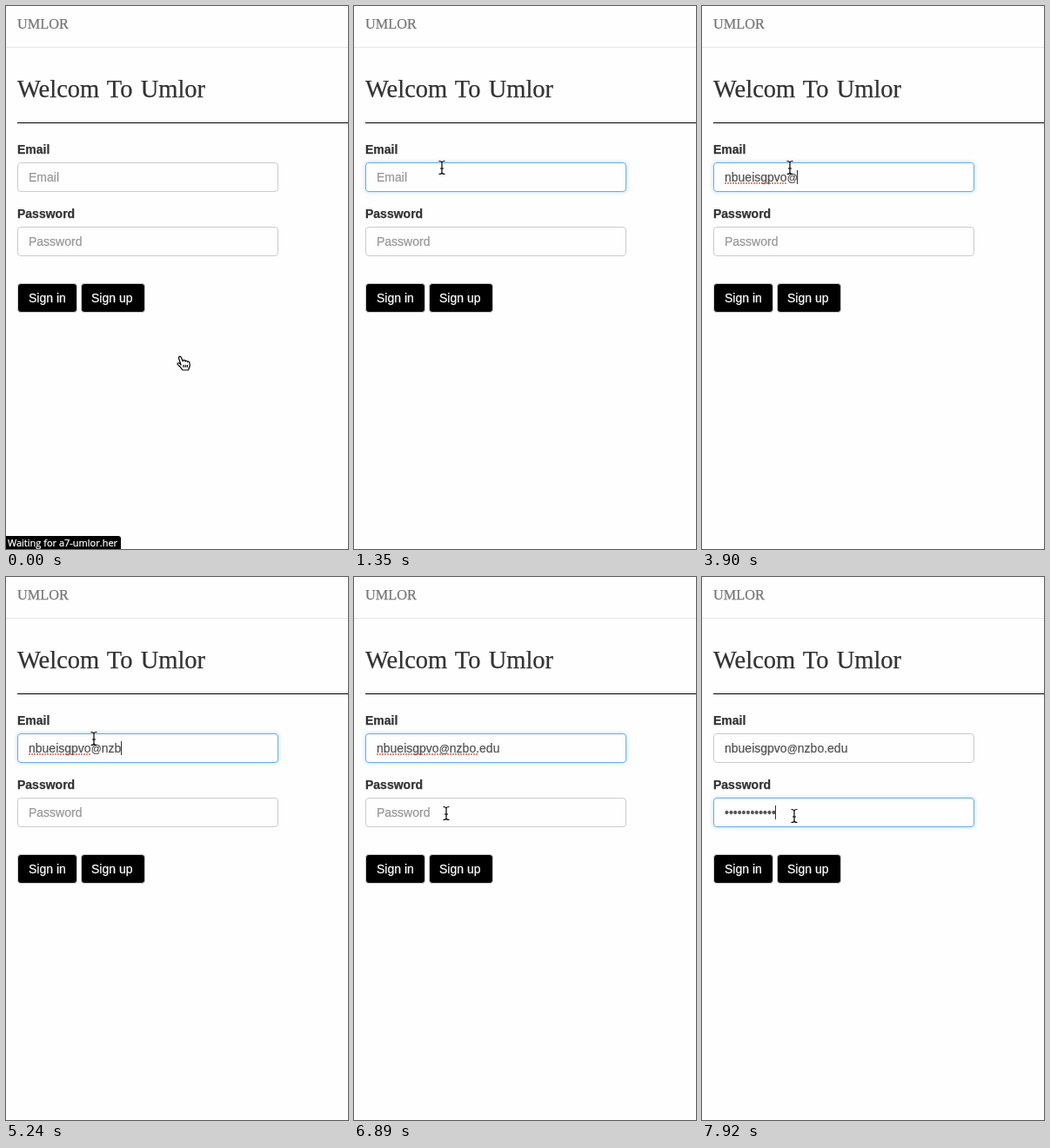
An HTML page that plays this animation: 393x625 px, repeating every 8000 ms.

```html
<!DOCTYPE html>
<html lang="en">
<head>
<meta charset="utf-8">
<title>Sign in</title>
<style>
html, body { margin: 0; width: 100%; height: 100%; overflow: hidden; background: #fefefe; }
svg { position: absolute; left: 0; top: 0; font: 14px "Liberation Sans", Arial, sans-serif; }
text { fill: currentColor; stroke: currentColor; stroke-width: .25px; }
.field {
  position: absolute; left: 13px; width: 300px; height: 34px; box-sizing: border-box;
  border: 1px solid #ccc; border-radius: 4px;
}
.field.focus { border-color: #66afe9; box-shadow: 0 0 4px rgba(102, 175, 233, .5); }
.serif { font-family: "Liberation Serif", "Times New Roman", serif; }
.bold { font-weight: bold; }
</style>
</head>
<body>
<div class="field" id="emailBox" style="top:180px"></div>
<div class="field" id="passBox" style="top:254px"></div>

<svg width="393" height="625" viewBox="0 0 393 625">
  <text class="serif" x="13" y="26" font-size="16.3" color="#777">UMLOR</text>
  <path d="M0 47.5H393" stroke="#e7e7e7"/>
  <text class="serif" x="13" y="105" font-size="28.5" word-spacing="2" color="#333">Welcom To Umlor</text>
  <path d="M13 134.5H393" stroke="#000"/>

  <g class="bold" color="#333">
    <text x="13" y="170">Email</text>
    <text x="13" y="244">Password</text>
  </g>
  <text id="email" x="26" y="202"></text>
  <text id="pass" x="26" y="276"></text>
  <path id="spell" fill="none" stroke="#e2604c" stroke-width="2" stroke-linecap="round" stroke-dasharray="0 3"/>
  <rect id="caret" width="1" height="16" fill="#333"/>

  <g stroke="#ccc">
    <rect x="13.5" y="319.5" width="68" height="33" rx="3.5"/>
    <rect x="86.5" y="319.5" width="73" height="33" rx="3.5"/>
  </g>
  <g color="#fff">
    <text x="26" y="341">Sign in</text>
    <text x="98" y="341">Sign up</text>
  </g>

  <g id="status">
    <path d="M0 610H129Q132 610 132 613V625H0Z"/>
    <svg width="132" height="625">
      <text x="2" y="622" color="#fff" style="font:11px 'Open Sans', sans-serif">Waiting for a7-umlor.her</text>
    </svg>
  </g>

  <g id="pointer">
    <path id="hand" fill="#fff" stroke="#000" stroke-width="1.2" stroke-linejoin="round"
      d="M-3 2L-5.4-5.2C-6-7.8-3.4-8.6-2.5-6.2L-.8-2C-.6-3.8 1.6-3.8 2-1.8C2.4-3.4 4.3-3 4.6-1.2C5-2.4 6.8-2 7 0L7.2 3.2L5.6 8H-1.2L-3.4 4.8L-6.8 1.6C-7.6 .2-5.8-.8-4.6 .2ZM0 2V5M2.2 2V5M4.4 2V5"/>
    <path id="arrow" stroke="#fff" d="M0 0V14L3.3 11.2L5.5 16.2L8 15L5.8 10.2H10.2Z"/>
    <g id="beam" fill="none">
      <path stroke="#fff" stroke-width="3" stroke-opacity=".8" d="M0-6V6"/>
      <path stroke="#000" stroke-width="1.2" d="M-3.5-7.5Q0-7.5 0-5.5Q0-7.5 3.5-7.5M0-6V6M-3.5 7.5Q0 7.5 0 5.5Q0 7.5 3.5 7.5M-2 1H2"/>
    </g>
  </g>
</svg>

<script>
const LOOP = 8000, TICK = 150;
const EMAIL = "nbueisgpvo@nzbo.edu";
const FOCUS = { email: 900, pass: 7180 };

// Bursts of typing; rate is characters per tick.
const KEYS = {
  email: [
    { start: 1650, count: 10, rate: 2.5 },
    { start: 3900, count: 1, rate: 1 },
    { start: 4340, count: 2, rate: 1 },
    { start: 5240, count: 2, rate: 1 },
    { start: 5840, count: 4, rate: 1 }
  ],
  pass: [{ start: 7320, count: 12, rate: 2.5 }]
};
const MOVES = [
  { start: 150, steps: 2, x: 140, y: 353 },
  { start: 450, steps: 4, x: 101, y: 186 },
  { start: 6590, steps: 4, x: 106, y: 275 }
];

const $ = id => document.getElementById(id);
const show = (id, on) => $(id).setAttribute("display", on ? "inline" : "none");
const ticks = (t, start) => Math.max(0, Math.floor((t - start) / TICK) + 1);
const typed = (t, bursts) => bursts.reduce(
  (n, b) => n + Math.min(b.count, Math.floor(ticks(t, b.start) * b.rate)), 0);

function setField(id, value, placeholder) {
  const el = $(id);
  el.innerHTML = (value || placeholder).replace("@", '<tspan font-size="12">@</tspan>');
  el.setAttribute("color", value ? "#555" : "#999");
  return value ? el.getComputedTextLength() : 0;
}

// The caret stays on after each key, then blinks.
function caretOn(t, focus) {
  let last = FOCUS[focus];
  for (const { start, count, rate } of KEYS[focus]) {
    const n = Math.min(ticks(t, start), Math.ceil(count / rate));
    if (n) last = start + (n - 1) * TICK;
  }
  return (t - last) % 1050 < 450;
}

function pointerAt(t) {
  let x = 204, y = 411;
  for (const m of MOVES) {
    const p = Math.min(1, ticks(t, m.start) / m.steps);
    const ease = 1 - (1 - p) ** 2.5;
    x += (m.x - x) * ease;
    y += (m.y - y) * ease;
  }
  return [Math.round(x), Math.round(y)];
}

function draw(t) {
  const focus = t >= FOCUS.pass ? "pass" : t >= FOCUS.email ? "email" : "";
  const email = EMAIL.slice(0, typed(t, KEYS.email));
  const width = {
    email: setField("email", email, "Email"),
    pass: setField("pass", "•".repeat(typed(t, KEYS.pass)), "Password")
  };
  for (const id in FOCUS) $(id + "Box").classList.toggle("focus", focus === id);

  show("caret", focus && caretOn(t, focus));
  $("caret").setAttribute("x", Math.floor(26 + (width[focus] || 0)));
  $("caret").setAttribute("y", focus === "pass" ? 263 : 189);

  // Only finished words are underlined.
  const checked = Math.max(email.indexOf("@"), email.indexOf("."));
  const marked = focus === "email" && checked > 0;
  show("spell", marked);
  if (marked) $("spell").setAttribute("d", `M27 204h${$("email").getSubStringLength(0, checked)}`);

  show("status", t < TICK);

  const [x, y] = pointerAt(t);
  const kind = y > 353 ? "hand" : y > 300 ? "arrow" : "beam";
  for (const id of ["hand", "arrow", "beam"]) show(id, id === kind);
  $("pointer").setAttribute("transform", `translate(${x} ${y})`);
}

function tick() {
  draw(performance.now() % LOOP);
  requestAnimationFrame(tick);
}
tick();
</script>
</body>
</html>
```
